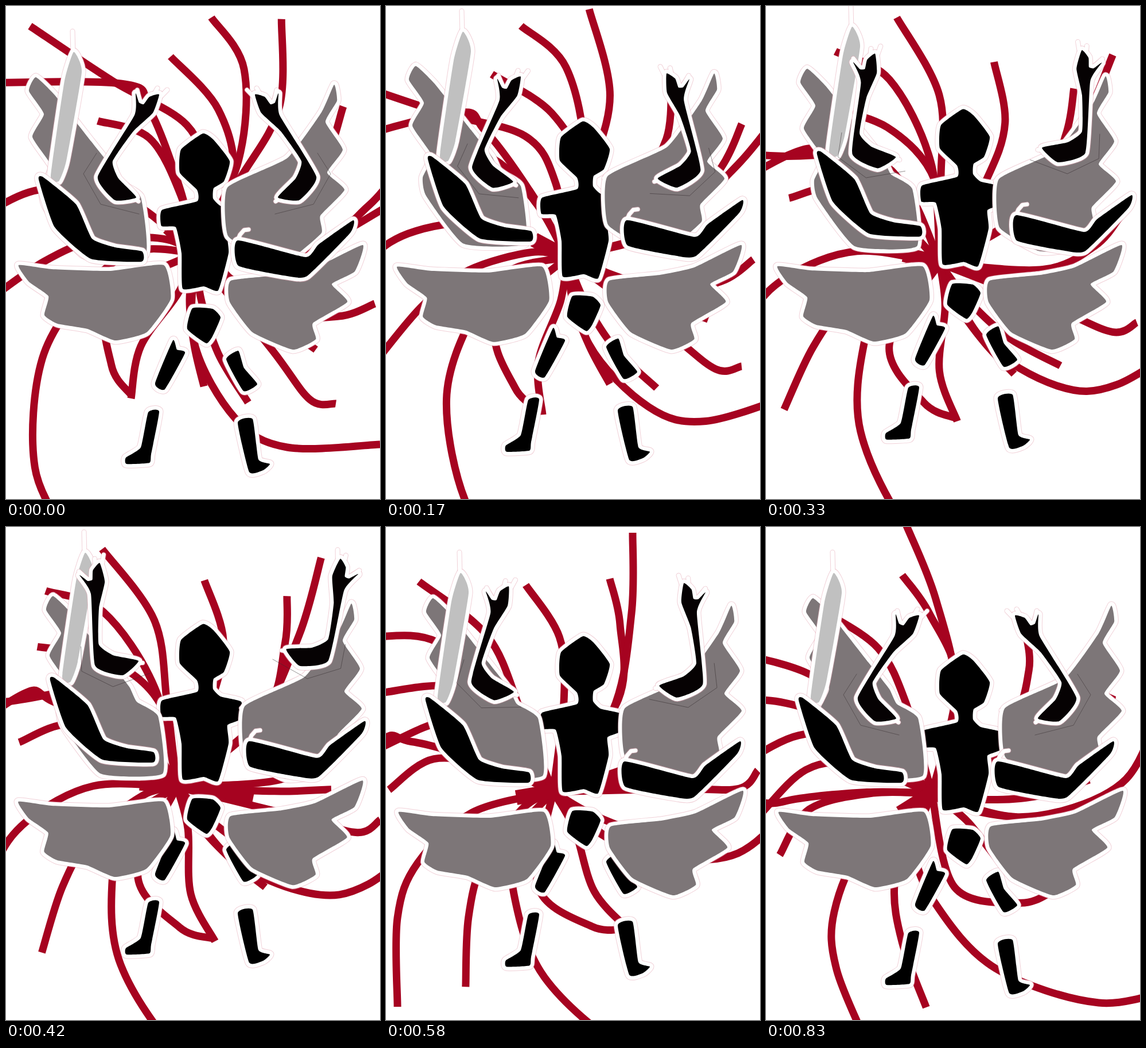
An HTML page for the animation above (910 ms loop, 652 by 858 pixels).

```html
<!DOCTYPE html>
<html>
<head>
<meta charset="utf-8">
<style>
html, body { margin: 0; width: 100%; height: 100%; overflow: hidden; background: #fff; }
svg { display: block; width: 652px; height: 858px; }
</style>
</head>
<body>
<svg id="stage" viewBox="0 0 652 858" xmlns="http://www.w3.org/2000/svg"></svg>
<script>
const NS = 'http://www.w3.org/2000/svg';
const stage = document.getElementById('stage');
const RED = '#a60320', GREY = '#7d7678', SILVER = '#c0c0c0', INK = '#000';
const LOOP = 910, STEPS = 11;

const add = (parent, tag, attrs = {}) => {
  const el = document.createElementNS(NS, tag);
  for (const name in attrs) el.setAttribute(name, attrs[name]);
  return parent.appendChild(el);
};
const group = () => add(stage, 'g', { 'stroke-linejoin': 'round', 'stroke-linecap': 'round' });
const line = (g, d, stroke, width, opacity = 1) =>
  add(g, 'path', { d, fill: 'none', stroke, 'stroke-width': width, 'stroke-opacity': opacity });
const parse = text => text.split(' ').map(p => p.split(',').map(Number));

// Smooth path through key points; a higher tension keeps corners sharper.
function curve(pts, closed, tension) {
  const n = pts.length;
  const p = i => pts[closed ? (i + n) % n : Math.max(0, Math.min(n - 1, i))];
  const lean = (a, from, to, sign) => a.map((v, i) => v + sign * (to[i] - from[i]) / tension);
  let d = `M${p(0)}`;
  for (let i = 0; i < (closed ? n : n - 1); i++)
    d += `C${lean(p(i), p(i - 1), p(i + 1), 1)} ${lean(p(i + 1), p(i), p(i + 2), -1)} ${p(i + 1)}`;
  return d;
}

// Cut-out pieces: faint pink rim, white border, then the fill.
function cutout(g, fill, shapes, spikes = []) {
  const edges = shapes.map(s => curve(parse(s), true, 13)).join('');
  const thorns = spikes.map(s => `M${s}`).join('');
  line(g, edges, '#e3a3b2', 15, .5);
  line(g, thorns, '#e3a3b2', 9, .5);
  line(g, edges, '#fff', 13);
  line(g, thorns, '#fff', 7);
  add(g, 'path', { d: edges, fill });
}

// The tentacle wheel turns steadily and lifts more and more.
const HUB = [353, 490], TURN = 7.55;
const lift = k => k ** 3 / 30;
function unwind([x, y], k) {
  const a = k * TURN * Math.PI / 180, dx = x - HUB[0], dy = y + lift(k) - HUB[1];
  return [HUB[0] + dx * Math.cos(a) - dy * Math.sin(a), HUB[1] + dx * Math.sin(a) + dy * Math.cos(a)];
}
const wheel = add(stage, 'g');
// Each tentacle: key points from the tip inwards, as they lie at the given step.
function tentacle(step, text) {
  const pts = parse(text).map(p => unwind(p, step));
  line(wheel, curve([...pts, [330, 430]], false, 6), RED, 13);
}
tentacle(0, '652,763 490,768 400,718 328,585');
tentacle(0, '575,692 530,685 465,600');
tentacle(0, '643,518 580,540 480,530');
tentacle(0, '540,598 460,540');
tentacle(0, '422,690 370,605 340,510');
tentacle(0, '345,662 328,590 320,510');
tentacle(0, '218,683 235,592 300,500');
tentacle(0, '358,20 415,110 405,270');
tentacle(0, '287,88 370,180 395,300');
tentacle(0, '160,200 250,230 305,330');
tentacle(0, '42,35 185,130 315,207 345,300');
tentacle(0, '-90,135 200,135 250,180 304,320');
tentacle(4, '228,20 302,155 305,300');
tentacle(4, '330,717 275,690 215,590');
tentacle(7, '390,90 408,170 405,300');
tentacle(7, '430,10 428,150 395,320');
tentacle(7, '20,835 20,680 55,585 150,497');
tentacle(8, '195,113 265,195 287,300');
tentacle(8, '183,820 172,700 185,600 240,500');
tentacle(10, '720,800 580,828 400,768 295,655 260,560');
line(wheel, 'M283,385L320,420L365,455L425,525', RED, 26);

const body = group();
cutout(body, INK, [
  '343,222 362,233 390,270 380,305 362,317 361,335 374,348 410,357 410,387 386,398 388,430 370,495 ' +
  '345,488 308,492 306,430 296,385 271,383 272,355 333,340 333,320 303,290 305,250',
  '325,526 360,527 374,542 360,575 349,587 316,562',
  '291,582 298,598 312,604 277,667 260,657',
  '384,615 405,600 415,630 438,658 414,670',
  '248,707 267,706 253,780 250,795 210,797 209,786 235,768',
  '404,725 430,719 440,789 460,797 448,808 424,811'
]);

const lowL = group(), lowR = group(), upper = group();
cutout(lowL, GREY, [
  '22,451 80,458 180,461 275,451 287,510 245,568 190,582 142,562 90,553 67,538 74,505 40,480'
]);
cutout(lowR, GREY, [
  '392,478 480,468 540,455 622,416 608,462 568,484 595,515 535,552 540,580 500,598 430,568 390,515'
]);
cutout(upper, GREY, [
  '52,124 85,155 148,235 185,282 198,308 235,333 243,433 135,433 70,350 64,318 80,280 46,228 66,188 40,148',
  '572,137 577,165 557,202 587,250 560,290 590,320 548,365 550,395 500,437 455,441 387,400 386,316 ' +
  '490,265 550,185'
], ['380,319 386,330']);

const fore = group();
cutout(fore, SILVER, ['118,80 132,115 105,270 92,305 78,295 102,130'], ['117,85 116,44']);
cutout(fore, INK, [
  '57,302 65,298 122,345 150,405 190,420 237,427 236,445 148,440 85,385',
  '605,373 600,395 525,470 490,470 405,452 404,408 522,437 545,415'
], ['402,412 408,398 415,390 423,389']);

function arm() {
  const g = group();
  line(g, 'M158,256 135,292 165,345 232,362', '#332b2e', .8, .6);
  cutout(g, '#060203', [
    '226,152 232,168 240,171 250,158 267,154 256,186 222,218 186,270 196,300 227,333 190,338 160,297 224,190'
  ], ['236,176 229,146', '246,174 264,143', '252,176 281,146', '222,334 231,340']);
  return g;
}
const armL = arm(), armR = arm();

const ramp = (k, from, to) => Math.max(0, Math.min(1, (k - from) / (to - from)));
const hump = (k, length) => Math.sin(Math.PI * ramp(k, 0, length));
const move = (el, x, y, rest = '') => el.setAttribute('transform', `translate(${x} ${y}) ${rest}`);

function show(k) {
  const up = 5 - Math.abs(5 - k), sq = up * up;
  const bob = hump(k, 5.3), drop = ramp(k, 4, 5.7);
  move(wheel, 0, -lift(k), `rotate(${-k * TURN} ${HUB})`);
  move(body, 0, -10.6 * up);
  move(lowL, -3 * bob, 3 * bob + 45 * drop);
  move(lowR, -3 * bob, 43 * drop);
  move(upper, 30 * ramp(k, 2, 5), -21 * bob);
  move(fore, up * (k < 5 ? 8 : 4), -45 * hump(k, 7));
  move(armL, -9.3 * up, -10.5 * up - 1.25 * sq, `rotate(${-2.5 * up - .87 * sq} 226 243)`);
  move(armR, 12 * up + .65 * sq, -11 * up - 1.6 * sq,
    `rotate(${8.7 * up} 475 243) translate(701 0) scale(-1 1)`);
}

// Steps last 80 or 90 ms: each starts on the nearest lower multiple of 10 ms.
const start = k => Math.floor(k * LOOP / STEPS / 10) * 10;
function tick() {
  const t = performance.now() % LOOP;
  let k = STEPS - 1;
  while (t < start(k)) k--;
  show(k);
  requestAnimationFrame(tick);
}
tick();
</script>
</body>
</html>
```
